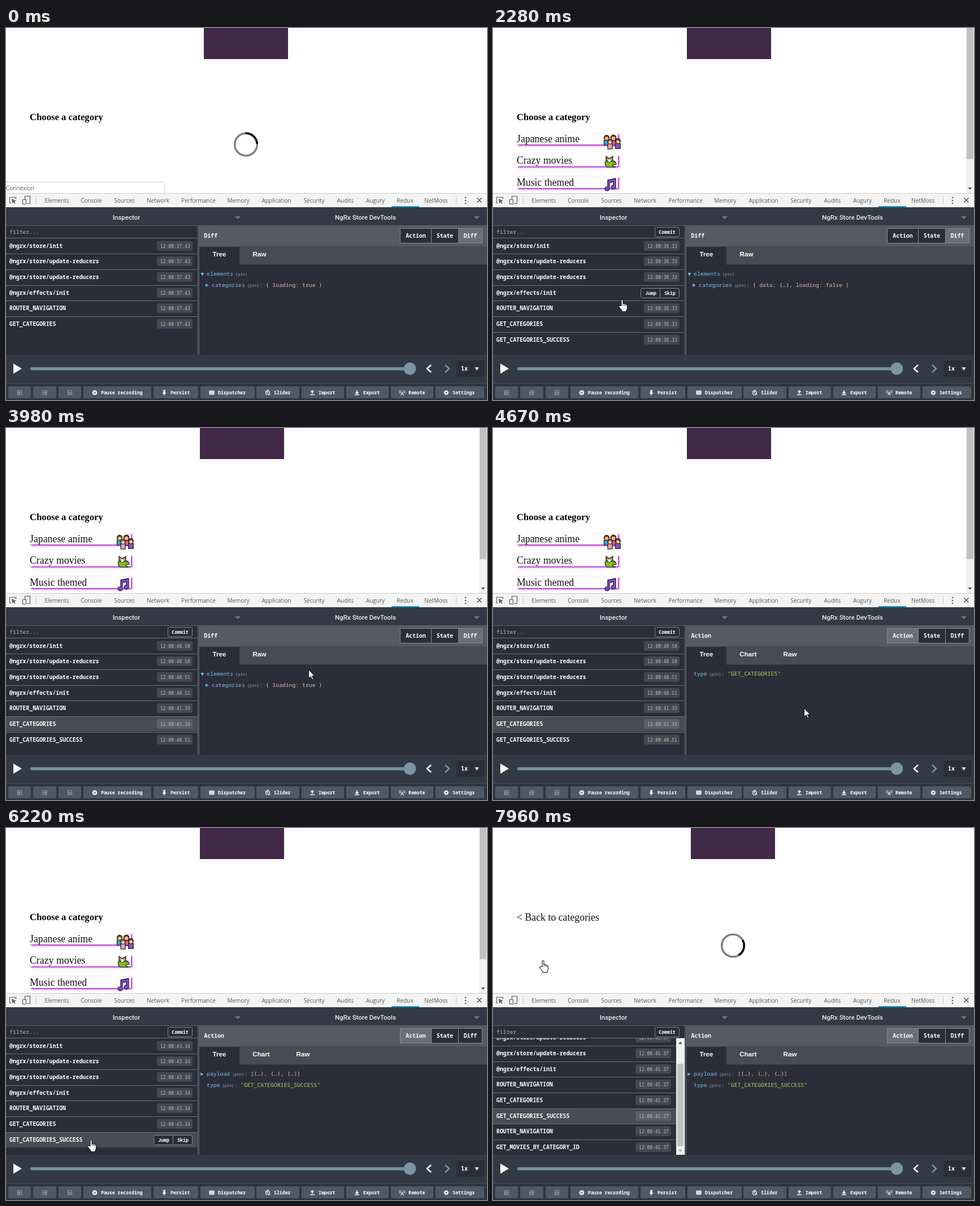
An HTML page for the animation above (8000 ms loop, 851 px wide and 658 px high).

```html
<!DOCTYPE html>
<html lang="en">
<head>
<meta charset="utf-8">
<title>Store DevTools</title>
<style>
  html, body { margin: 0; width: 100%; height: 100%; overflow: hidden; background: #fff; }
  svg { display: block; }
  .serif { font: 17.8px "Liberation Serif", serif; fill: #111; }
  .h { font-size: 16.7px; font-weight: bold; fill: #000; }
  .tab { font: 10px "Open Sans", sans-serif; fill: #5a5a5a; }
  .head { font: 500 11.5px Roboto, sans-serif; fill: #eee; }
  .mono { font: 500 9.8px "Noto Sans Mono", monospace; }
  .b { font-weight: 600; fill: #fff; }
  .btn { font-size: 8.2px; }
  .stamp { font-size: 8px; fill: #b8bbc0; }
  .pin { font-size: 7px; fill: #a0a3a9; }
  .sub { font: bold 11.6px "Liberation Sans", sans-serif; fill: #fff; }
  .mid { text-anchor: middle; }
  .key { fill: #78bfe0; }
  .val { fill: #dcb8ab; }
  .str { fill: #b0d863; }
</style>
</head>
<body>
<svg width="851" height="658" viewBox="0 0 851 658">
  <defs>
    <clipPath id="log"><rect y="372" width="339" height="206"/></clipPath>
    <clipPath id="page"><rect width="851" height="292"/></clipPath>
  </defs>
  <g id="back"></g>
  <g id="live"></g>
</svg>
<script>
const DARK = '#2b2e39', BAR = '#343a45', LINE = '#6a6f78', ROW = 27.67;

const text = (x, y, s, cls) => `<text x="${x}" y="${y}" class="${cls}">${s.replace(/</g, '&lt;')}</text>`;
const rect = (x, y, w, h, fill, more = '') => `<rect x="${x}" y="${y}" width="${w}" height="${h}" fill="${fill}" ${more}/>`;
const path = (d, fill, more = '') => `<path d="${d}" fill="${fill}" ${more}/>`;
const stroke = (d, color, w = 1, more = '') => path(d, 'none', `stroke="${color}" stroke-width="${w}" ${more}`);
const circle = (x, y, r, fill, more = '') => `<circle cx="${x}" cy="${y}" r="${r}" fill="${fill}" ${more}/>`;
const group = (content, more) => `<g ${more}>${content}</g>`;
const at = (x, y, content, scale = 1) => group(content, `transform="translate(${x} ${y}) scale(${scale})"`);
const down = (x, y, w, h, fill) => path(`M${x - w / 2} ${y - h / 2}h${w}l${-w / 2} ${h}z`, fill);
const right = (x, y, w, h, fill) => path(`M${x - w / 2} ${y - h / 2}v${h}l${w}-${h / 2}z`, fill);

// Parts that never change
function backdrop() {
  const tabs = [['Elements', 90], ['Console', 151], ['Sources', 209.5], ['Network', 269], ['Performance', 340.5],
    ['Memory', 411], ['Application', 478.5], ['Security', 545], ['Audits', 600.5], ['Augury', 653.5],
    ['Redux', 706], ['NetMoss', 761]];
  const tools = [['', 4, 40], ['', 48, 41], ['', 93, 40], ['Pause recording', 137, 120, 168], ['Persist', 261, 79, 291],
    ['Dispatcher', 344, 96, 375], ['Slider', 443, 76, 474], ['Import', 523, 75, 553], ['Export', 602, 75, 632],
    ['Remote', 681, 75, 712], ['Settings', 760, 86, 790]];
  const arrow = 'M-4 3.5H4M0 1.5V-3M-2.5-1L0-3.5L2.5-1';
  const grid = split => stroke(`M-3.5-3.5h7v7h-7zM-3.5 0h7${split}`, '#9aa3aa');
  const icons = [
    grid('M-1-3.5v7'), grid('M1-3.5v7'), grid('M0 0v3.5'),
    circle(0, 0, 4.3, '#fff') + stroke('M-1.2-2v4M1.2-2v4', '#4d5a65', 1.2),
    path('M-2.5-4.5h5v1h-1v3l1.5 1.5v1h-2.3v3h-1.4v-3H-3v-1l1.5-1.5v-3h-1z', '#fff'),
    rect(-4.5, -3.5, 9, 7, '#fff', 'rx="1"') + stroke('M-3-1.2h6M-3 1.2h6', '#4d5a65', 1.1, 'stroke-dasharray="1.4 .9"'),
    circle(0, .6, 3.4, 'none', 'stroke="#fff" stroke-width="1.2"') + stroke('M-1.5-4.5h3M0 .6V-1.5M-4-3.5l8 8', '#fff'),
    stroke(arrow, '#fff', 1.6),
    stroke('M-4 3.5H4M0-4V1M-2.5-1L0 1.5L2.5-1', '#fff', 1.6),
    stroke('M0-1L-2.5 5M0-1L2.5 5M-1.5 2.5h3M-2-3.5q-1.5 2 0 4M2-3.5q1.5 2 0 4M-4-4.5q-2.5 3 0 6M4-4.5q2.5 3 0 6', '#fff', .9),
    circle(0, 0, 2.5, 'none', 'stroke="#fff" stroke-width="2"') + circle(0, 0, 4, 'none', 'stroke="#fff" stroke-dasharray="1.6 1.54"')
  ];
  let s = rect(0, 292, 851, 25, '#f3f3f3') + rect(0, 292, 851, 1, '#ccc');
  s += stroke('M9 309.5H6.5v-10H17.5V303', '#5a5a5a', 1.2) + path('M10 302l8 4-3.5 1 2.5 3-1.2 1-2.5-3-2 2.5z', '#5a5a5a');
  s += stroke('M33.5 303v-5.5h9v13H37M29.5 303.5h6v8h-6z', '#5a5a5a', 1.2);
  s += stroke('M53.5 298v14M796.5 298v14', '#ccc');
  for (const [name, x] of tabs) s += text(x, 309, name, 'tab mid');
  s += rect(682, 315, 49, 2, '#1a9bd7');
  for (const y of [300, 305, 310]) s += circle(813, y, 1.3, '#5a5a5a');
  s += stroke('M833.5 300.5l8 8m0-8l-8 8', '#555', 1.5);

  s += rect(0, 317, 851, 341, DARK) + rect(0, 317, 851, 32, BAR) + rect(0, 349, 851, 1, '#595e67');
  s += text(213, 339, 'Inspector', 'head mid') + text(636, 339, 'NgRx Store DevTools', 'head mid');
  s += down(410, 335.5, 10, 5, '#737b87') + down(833, 335.5, 10, 5, '#737b87');
  s += group(text(6, 364, 'filter...', 'mono'), 'fill="#b8babe"') + rect(0, 371, 339, 1, LINE);
  s += stroke('M339.5 350v228M341.5 350v228', LINE);
  s += rect(342, 350, 509, 36, '#575a61') + rect(342, 386, 509, 32.5, '#484b53') + rect(342, 387, 71, 32, DARK);

  s += rect(0, 578, 851, 50, BAR) + path('M13 593.5v18l15-9z', '#fff');
  s += rect(43, 600, 672, 5.5, '#76919c', 'rx="2.5"') + circle(714.5, 602.5, 10.8, '#7b96a2');
  s += stroke('M752 596l-7 6.500 7 6.500', '#fff', 2.5) + stroke('M777 596l7 6.500-7 6.500', '#8b8e95', 2.5);
  s += rect(797, 588, 49, 29, DARK, 'rx="3"') + group(text(805, 606, '1x', 'mono b'), 'style="font-size:9px"') + down(833, 603, 7.5, 5.5, '#fff');

  s += rect(0, 628, 851, 30, '#30353f') + rect(0, 628, 851, 1, '#4a515c');
  tools.forEach(([name, x, w, tx], i) => {
    s += rect(x, 634, w, 21, '#4d5a65', 'rx="2"') + at(tx ? tx - 11 : x + w / 2, 645, icons[i]);
    if (name) s += text(tx, 648, name, 'mono b btn');
  });
  return s;
}

const ink = 'stroke="#1c1c1c" stroke-width="1.2"';
const person = (x, y, hair, skin, shirt, r) =>
  rect(x - r, y + r, r * 2, 9, shirt, ink) + circle(x, y, r, hair, ink) + circle(x, y + 1.3, r * .68, skin);
const family = person(-10, -5, '#5b3a1d', '#f7b889', '#35a0d8', 4.5) + person(2, -5, '#6b3a1a', '#f7b889', '#d85c9a', 4.8) +
  person(-4, 2, '#8b5a23', '#ffcf9f', '#e8a0b8', 4) + person(10, 1, '#6b3a1a', '#ffcf9f', '#8b54b5', 4.3);
const creature = path('M-9-1Q-4-4 0-1L6-2Q10 0 10 4L4 5Q3 8 9 9H-6Q-11 7-9-1z', '#7ac21b', ink) +
  path('M-8-10l4 3h4l4-3v8q-6 4-12 0z', '#8a7668', ink) + circle(-2, -2.5, 2.5, '#eee') +
  circle(-5, -5, 1, '#ffe14d') + circle(1, -5, 1, '#ffe14d') + circle(6, .5, .9, '#222');
const note = path('M-5-7L9-10V5a4 3.5 0 1 1-4-3V-4L-2-2V8a4 3.5 0 1 1-3-3z', '#7b4fd0', 'stroke="#21173a" stroke-width="1.3"');

function spinner(y, angle) {
  return circle(424.5, y, 19.8, 'none', 'stroke="#808080" stroke-width="3.5"') +
    group(stroke('M-14-14A19.8 19.8 0 0 1 14-14', '#000', 3.5), `transform="translate(424.5 ${y}) rotate(${angle})"`);
}

function page(t) {
  const list = t >= 745 && t < 7720;
  let s = rect(list ? 343 : 350, -94, 149, 149, '#432948');
  if (t >= 7720) return s + text(42, 164, '< Back to categories', 'serif') + spinner(208, (t - 7670) * .36);
  s += text(42, 163, 'Choose a category', 'serif h');
  if (!list) {
    s += spinner(206, (t + 115) * .36);
    if (t < 400) s += rect(-2, 272.5, 282.5, 22, '#fff', 'rx="3" stroke="#ccc"') + text(0, 287, 'Connexion', 'tab');
    return s;
  }
  const grow = 1 + .4 * Math.min(1, Math.max(0, (t - 6950) / 170));
  ['Japanese anime', 'Crazy movies', 'Music themed'].forEach((name, i) => {
    const y = 185.5 + i * 38.5;
    s += rect(42, y, 179, 20.5, '#fff', 'style="filter:drop-shadow(2px 2px 1.5px #b312cf)"');
    s += text(42, Math.round(y + 16), name, 'serif');
  });
  if (t >= 6950) s += rect(42, 242, 98.5, 1, '#111');
  s += at(211, 199, family) + at(208 - (grow - 1) * 2, 237, creature, grow) + at(208, 276, note);
  return s + rect(837, 0, 14, 292, '#f1f1f1') + rect(838, 0, 12, 232, '#c1c1c1') + down(844, 284, 7, 4, '#505050');
}

function stamp(i, t) {
  if (t < 745) return '37.43';
  if (t < 2915) return '38.33';
  if (t < 5760) {
    if (i === 4 && t >= 3805) return '41.39';
    if (i === 5 && t >= 3755) return '41.34';
    return i < 2 ? '40.50' : '40.51';
  }
  if (t < 7785) return i === 6 && t >= 6590 ? '44.17' : '43.34';
  return '45.37';
}

// Value of the last [time, value] step already reached
const step = (steps, t) => steps.reduce((v, [time, next]) => t >= time ? next : v, -1);
const hovers = [[2270, 3], [2380, 4], [2480, 5], [3755, 4], [3805, -1], [5300, 6], [6590, -1]];
const picks = [[2915, 5], [5760, 6]];
const actions = ['@ngrx/store/init', '@ngrx/store/update-reducers', '@ngrx/store/update-reducers', '@ngrx/effects/init',
  'ROUTER_NAVIGATION', 'GET_CATEGORIES', 'GET_CATEGORIES_SUCCESS', 'ROUTER_NAVIGATION', 'GET_MOVIES_BY_CATEGORY_ID'];

function log(t) {
  const count = t < 745 ? 6 : t < 7785 ? 7 : 9, scrolled = count > 7;
  const edge = scrolled ? 324 : 339, hover = step(hovers, t), picked = step(picks, t);
  let s = '';
  for (let i = 0; i < count; i++) {
    const top = Math.floor(372 + i * ROW) - (scrolled ? 42 : 0), mid = top + 13.5;
    if (i === picked) s += rect(0, top, edge, 27, '#4a4c55');
    if (i) s += rect(0, top, edge, 1, LINE);
    s += text(6, mid + 3.5, actions[i], 'mono b');
    if (i === hover) {
      s += rect(261.5, mid - 8, 68, 17, DARK, 'rx="3" stroke="#858a93"') + rect(295, mid - 8, 1, 17, '#858a93');
      s += text(279, mid + 3.5, 'Jump', 'mono b btn mid') + text(313, mid + 3.5, 'Skip', 'mono b btn mid');
    } else {
      s += rect(edge - 72, mid - 8.5, 63, 17, i === picked ? '#5d6067' : '#46484f', 'rx="3"');
      s += text(edge - 66, mid + 3.5, '12:00:' + stamp(i, t), 'mono stamp');
    }
  }
  s = group(s, 'clip-path="url(#log)"');
  if (count > 6) s += rect(286.5, 352.5, 43, 17, DARK, 'rx="3" stroke="#858a93"') + text(308, 364, 'Commit', 'mono b btn mid');
  if (scrolled) s += rect(324, 372, 15, 206, '#f1f1f1') + rect(326, 417, 11, 146, '#c1c1c1') +
    down(331.5, 380, 7, -4, '#505050') + down(331.5, 571, 7, 4, '#a3a3a3');
  return s;
}

function field(x, y, key, value, cls) {
  const pin = x + key.length * 5.89 + 4;
  return text(x, y, key, 'mono key') + text(pin, y, '(pin)', 'mono pin') +
    (value ? text(pin + 21, y, ':', 'mono key') + text(pin + 32.5, y, value, 'mono ' + cls) : '');
}

function details(t) {
  const action = t >= 4515, mode = action ? 'Action' : 'Diff';
  let s = text(350.5, 371, mode, 'mono b');
  for (const [name, x, w] of [['Action', 697.5, 55], ['State', 752.5, 48], ['Diff', 800.5, 42]])
    s += rect(x, 354.5, w, 26, name === mode ? '#6b6e74' : DARK, 'stroke="#858a93"') + text(x + w / 2, 371, name, 'mono b mid');
  s += text(377.5, 404, 'Tree', 'sub mid');
  if (!action) {
    const value = t >= 745 && t < 2915 ? '{ data: {…}, loading: false }' : '{ loading: true }';
    return s + text(448.5, 404, 'Raw', 'sub mid') + down(347.5, 436, 6, 6, '#6fb3d2') + right(356, 455, 5.5, 6, '#6fb3d2') +
      field(355, 438, 'elements') + field(364, 458, 'categories', value, 'val');
  }
  s += text(451.5, 404, 'Chart', 'sub mid') + text(525.5, 404, 'Raw', 'sub mid');
  if (t < 5760) return s + field(355, 438, 'type', '"GET_CATEGORIES"', 'str');
  return s + right(347, 435.5, 5.5, 6, '#6fb3d2') + field(355, 438, 'payload', '[{…}, {…}, {…}]', 'val') +
    field(355, 458, 'type', '"GET_CATEGORIES_SUCCESS"', 'str');
}

const route = [[1280, 841, 314], [1370, 841, 314], [1500, 770, 262], [1640, 660, 252], [1850, 480, 330], [2060, 349, 425],
  [2140, 330, 440], [2350, 180, 500], [2590, 102, 525], [3560, 102, 525], [3755, 200, 508], [3805, 300, 490], [4000, 560, 420],
  [4200, 715, 370], [4515, 718, 368], [4600, 650, 425], [4670, 550, 495], [4740, 550, 495], [4950, 330, 530], [5290, 151, 551],
  [6430, 151, 551], [6590, 148, 525], [6800, 110, 380], [7000, 89, 234], [8000, 89, 234]];
const hands = [[2200, 1], [3805, 0], [4200, 1], [4580, 0], [5200, 1], [6590, 0], [6950, 1]];

function cursor(t) {
  const i = route.findIndex(p => p[0] > t);
  if (i < 1) return '';
  const [a, b] = [route[i - 1], route[i]], k = (t - a[0]) / (b[0] - a[0]);
  const x = Math.round(a[1] + (b[1] - a[1]) * k), y = Math.round(a[2] + (b[2] - a[2]) * k);
  const outline = 'stroke="#1b1b24" stroke-width="1.1" stroke-linejoin="round"';
  return step(hands, t) > 0
    ? at(x - 7, y, path('M5 11.5V2a1.5 1.5 0 0 1 3 0v5.5q2-1 2.7.7 2-.8 2.5.8 2-.4 2.3 1.5v5q0 2-1.7 4v2H6v-1.5L1 13.5q-1-2.5 1.5-2.5z', '#fff', outline) +
        stroke('M8 7.5v4M10.7 8.5v3M13.2 9.5v2.5', '#1b1b24', .9))
    : at(x, y, path('M.5.5V16l3.6-3.4 2.4 5.7 2.4-1-2.4-5.5h5z', '#fff', outline));
}

const back = document.getElementById('back'), live = document.getElementById('live');
back.innerHTML = backdrop();
const start = performance.now();
let shown = '';

function draw() {
  const t = (performance.now() - start) % 8000;
  const next = group(page(t), 'clip-path="url(#page)"') + log(t) + details(t) + cursor(t);
  if (next !== shown) live.innerHTML = shown = next;
  requestAnimationFrame(draw);
}
draw();
</script>
</body>
</html>
```
